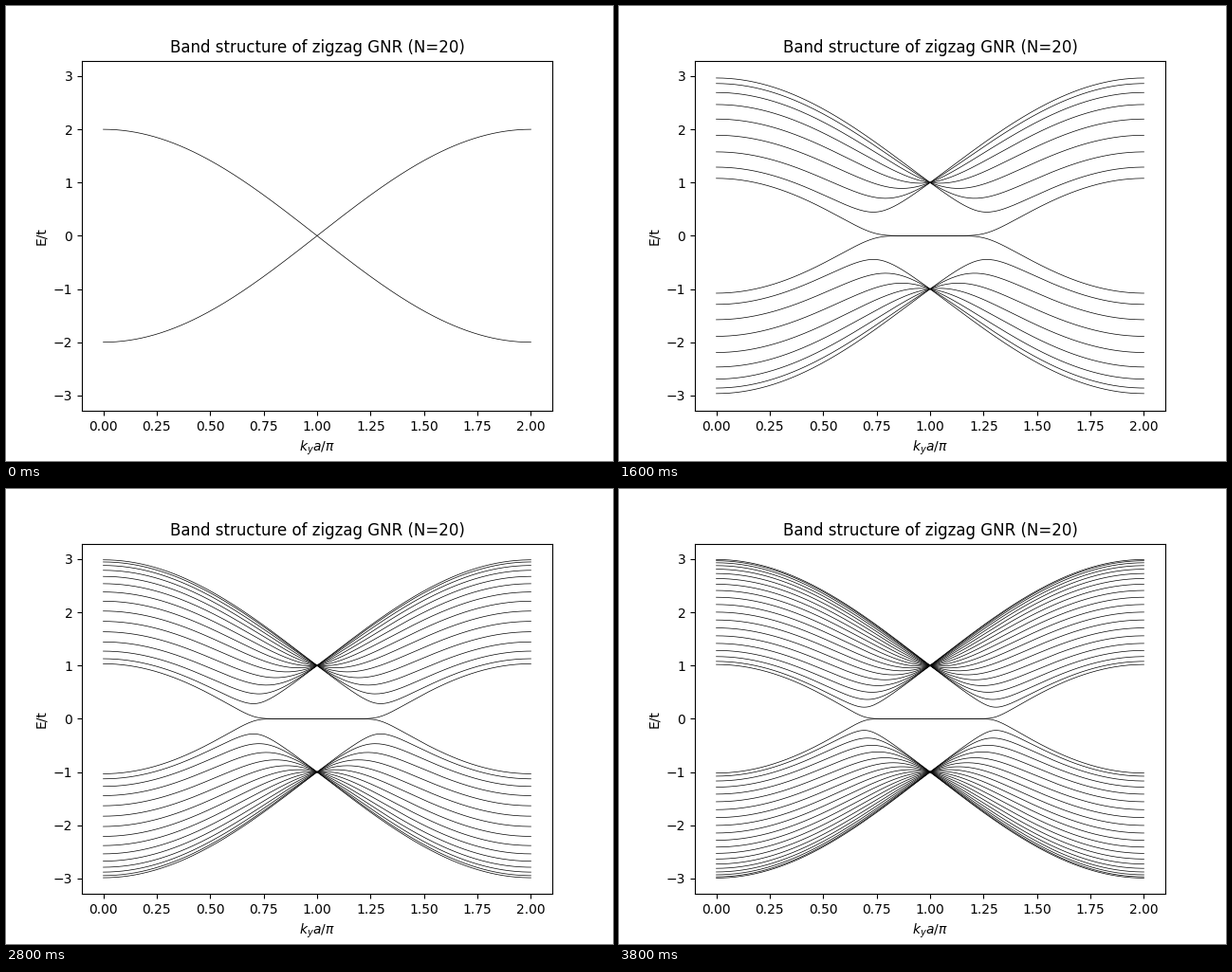
A matplotlib script for the animation above (4000 ms loop, 640x480 px).

```python
import numpy as np
import matplotlib.pyplot as plt
from matplotlib.animation import FuncAnimation

N_MAX = 20
K = np.linspace(0, 2, 201)  # k_y a in units of pi


def bands(n):
    """Energies of a zigzag ribbon with n chains, shape (len(K), 2n)."""
    h = np.zeros((K.size, 2 * n, 2 * n))
    for i in range(2 * n - 1):
        hop = 2 * np.cos(np.pi * K / 2) if i % 2 == 0 else 1.0
        h[:, i, i + 1] = h[:, i + 1, i] = hop
    return np.linalg.eigvalsh(h)


spectra = [bands(n) for n in range(1, N_MAX + 1)]

fig, ax = plt.subplots(figsize=(6.4, 4.8), dpi=100)
ax.set_title(f"Band structure of zigzag GNR (N={N_MAX})")
ax.set_xlabel(r"$k_y a/\pi$")
ax.set_ylabel("E/t")
ax.set_xlim(-0.1, 2.1)
e_max = 1.1 * spectra[-1].max()
ax.set_ylim(-e_max, e_max)

lines = [ax.plot([], [], color="black", lw=0.5)[0] for _ in range(2 * N_MAX)]


def update(frame):
    energies = spectra[frame].T
    for i, line in enumerate(lines):
        if i < len(energies):
            line.set_data(K, energies[i])
        else:
            line.set_data([], [])
    return lines


anim = FuncAnimation(fig, update, frames=N_MAX, init_func=lambda: update(0),
                     interval=200, repeat=True, repeat_delay=0)
plt.show()
```
